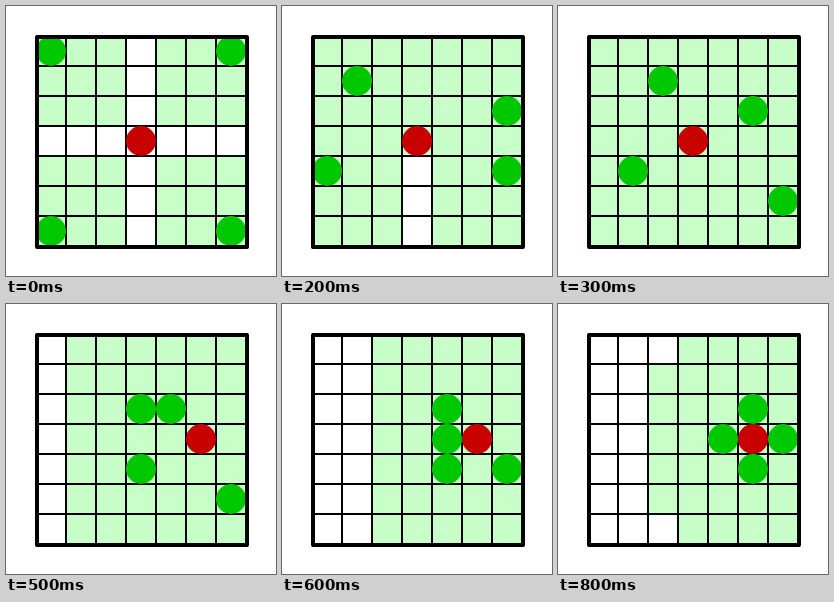
An HTML page with a canvas that plays this animation: 270 px wide and 270 px high, repeating every 0.9 s.

```html
<!DOCTYPE html>
<html lang="en">
<head>
<meta charset="utf-8">
<title>Pursuit on a grid</title>
<style>
  html, body { margin: 0; width: 100%; height: 100%; overflow: hidden; background: #fff; }
  canvas { display: block; }
</style>
</head>
<body>
<canvas id="stage" width="270" height="270"></canvas>
<script>
const ctx = document.getElementById("stage").getContext("2d");
const SIZE = 7, CELL = 30, ORIGIN = 30, SIGHT = 2;
const STEP = 100, STEPS = 9;

// Each walker has a start cell and one move per step: U, D, L, R or "." to wait.
const hunters = [
  { col: 0, row: 0, moves: "RDRDRRR." },
  { col: 6, row: 0, moves: "DDL.LD.." },
  { col: 0, row: 6, moves: "UURRRRR." },
  { col: 6, row: 6, moves: "UUDDUU.U" }
];
const prey = { col: 3, row: 3, moves: "...RR..." };
const MOVES = { U: [0, -1], D: [0, 1], L: [-1, 0], R: [1, 0], ".": [0, 0] };

function cellAt(walker, step) {
  let { col, row } = walker;
  for (const move of walker.moves.slice(0, step)) {
    col += MOVES[move][0];
    row += MOVES[move][1];
  }
  return { col, row };
}

const edge = i => ORIGIN + i * CELL;

function drawDisc({ col, row }, color) {
  ctx.fillStyle = color;
  ctx.beginPath();
  ctx.arc(edge(col) + CELL / 2, edge(row) + CELL / 2, CELL / 2, 0, Math.PI * 2);
  ctx.fill();
}

function drawSight({ col, row }) {
  const left = Math.max(0, col - SIGHT), right = Math.min(SIZE, col + SIGHT + 1);
  const top = Math.max(0, row - SIGHT), bottom = Math.min(SIZE, row + SIGHT + 1);
  ctx.fillStyle = "#c8ffc8";
  ctx.fillRect(edge(left), edge(top), (right - left) * CELL, (bottom - top) * CELL);
}

function drawGrid() {
  ctx.fillStyle = "#000";
  for (let i = 1; i < SIZE; i++) {
    ctx.fillRect(edge(i) - 1, ORIGIN, 2, SIZE * CELL);
    ctx.fillRect(ORIGIN, edge(i) - 1, SIZE * CELL, 2);
  }
}

function drawBorder() {
  ctx.strokeStyle = "#000";
  ctx.lineWidth = 4;
  ctx.lineJoin = "round";
  ctx.strokeRect(ORIGIN + 1, ORIGIN + 1, SIZE * CELL, SIZE * CELL);
}

function draw(step) {
  const cells = hunters.map(hunter => cellAt(hunter, step));
  ctx.fillStyle = "#fff";
  ctx.fillRect(0, 0, 270, 270);
  cells.forEach(drawSight);
  drawGrid();
  cells.forEach(cell => drawDisc(cell, "#00c800"));
  drawDisc(cellAt(prey, step), "#c80000");
  drawBorder();
}

let start;
function tick(now) {
  start ??= now;
  draw(Math.floor(Math.max(0, now - start) / STEP) % STEPS);
  requestAnimationFrame(tick);
}
draw(0);
requestAnimationFrame(tick);
</script>
</body>
</html>
```
